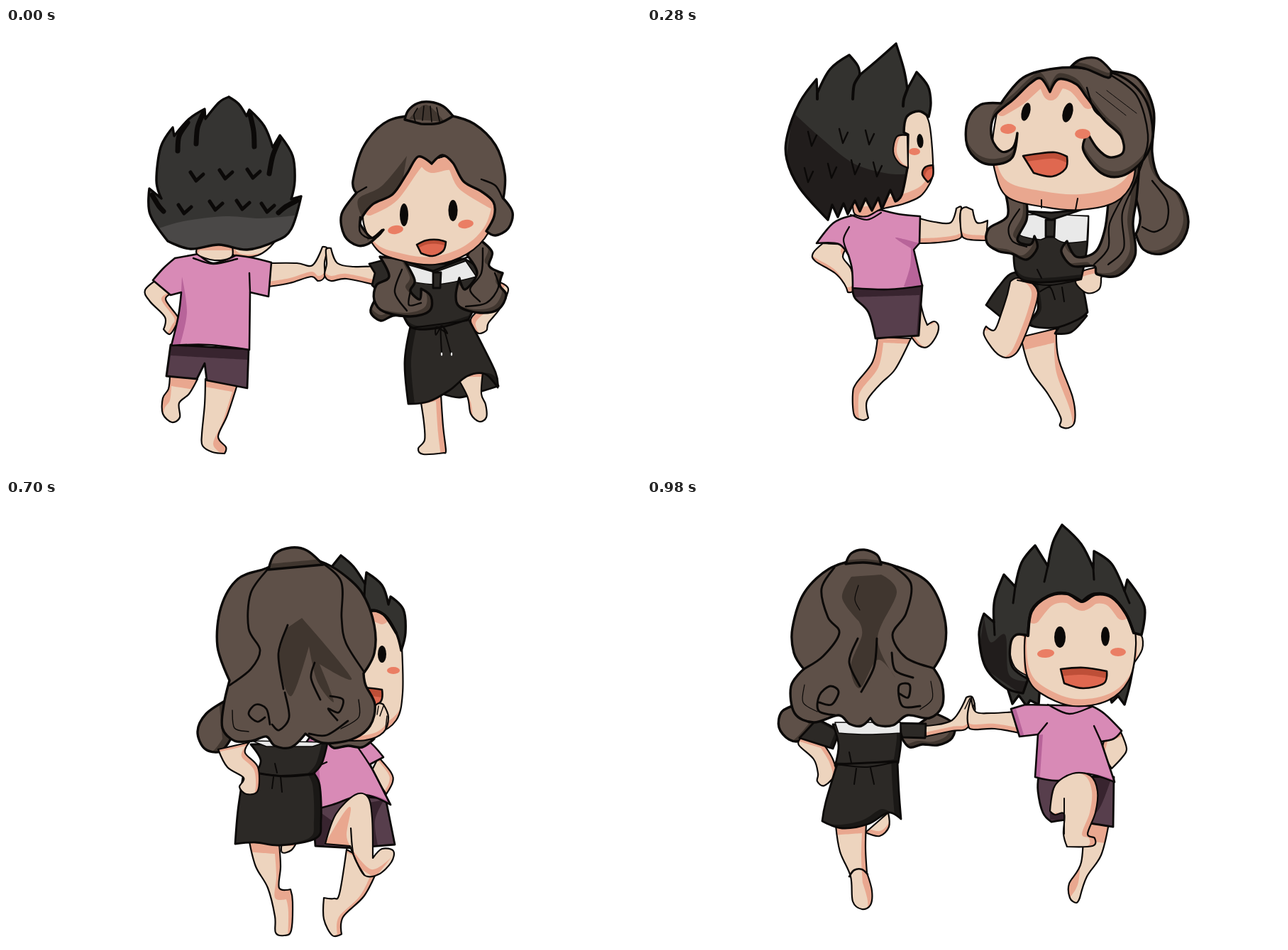
Write an HTML page that moves like this. It is 895x625 px and loops after 1.12 s.

```html
<!DOCTYPE html>
<html lang="en">
<head>
<meta charset="utf-8">
<title>Spinning dance</title>
<style>
html, body { margin: 0; width: 100%; height: 100%; overflow: hidden; background: #fff; }
svg { display: block; width: 100%; height: 100%; }
</style>
</head>
<body>
<svg id="stage" viewBox="0 0 895 625" stroke-linejoin="round" stroke-linecap="round"></svg>
<script>
const INK = '#0b0908', STEP = 140;
let clips = 0;

// Smooth curve through "x,y" points; a trailing "!" makes a corner.
function curve(text, closed) {
  const pts = [...text.matchAll(/(\d+),(\d+)(!?)/g)].map(m => ({ x: +m[1], y: +m[2], sharp: m[3] }));
  const n = pts.length;
  const at = i => closed ? pts[(i + n) % n] : pts[Math.max(0, Math.min(n - 1, i))];
  const handle = (i, side) => {
    const p = at(i), k = p.sharp ? 0 : side / 6;
    return `${p.x + (at(i + 1).x - at(i - 1).x) * k} ${p.y + (at(i + 1).y - at(i - 1).y) * k}`;
  };
  let d = `M${pts[0].x} ${pts[0].y}`;
  for (let i = 0; i < n - !closed; i++)
    d += `C${handle(i, 1)} ${handle(i + 1, -1)} ${at(i + 1).x} ${at(i + 1).y}`;
  return d;
}

// Shading is either a drawn patch or the shape's own rim, left bare by a shifted copy.
const material = (fill, shade, width) => (outline, dx = 0, dy = 0) => {
  const d = curve(outline, true), id = 'clip' + clips++, patch = typeof dx === 'string';
  const inner = patch ? `<path d="${curve(dx, true)}" fill="${shade}"/>`
    : `<path d="${d}" fill="${fill}" transform="translate(${dx} ${dy})"/>`;
  return `<clipPath id="${id}"><path d="${d}"/></clipPath><path d="${d}" fill="${patch ? fill : shade}"/>` +
    `<g clip-path="url(#${id})">${inner}</g><path d="${d}" fill="none" stroke="${INK}" stroke-width="${width}"/>`;
};
const skin = material('#edd4be', '#e9a78f', 2.2);
const spiky = material('#33322f', '#211d1c', 3.4);
const nape = material('#353432', '#4a4847', 3.4);
const shirt = material('#d88ab6', '#b8649a', 2.6);
const shorts = material('#573e4c', '#38242f', 2.8);
const hair = material('#5e5048', '#40362f', 3.4);
const dress = material('#2c2926', '#1a1816', 2.8);
const white = material('#e9e9e9', '#ccc', 1.5);
const mouth = material('#df6850', '#be4f38', 2.6);

const line = (width, path, color = INK) =>
  `<path d="${curve(path)}" fill="none" stroke="${color}" stroke-width="${width}"/>`;
const lines = (width, ...paths) => paths.map(p => line(width, p)).join('');
const glow = path => line(18, path, '#e9a78f');
const oval = (fill, x, y, rx, ry, turn = 0) =>
  `<ellipse cx="${x}" cy="${y}" rx="${rx}" ry="${ry}" fill="${fill}" transform="rotate(${turn} ${x} ${y})"/>`;
const eye = (...a) => oval(INK, ...a);
const blush = (...a) => oval('#ea7e64', ...a);
const ticks = (width, w, h, ...spots) => lines(width, ...spots.map(([x, y]) =>
  `${x - w},${y - h}! ${x - 1},${y + h}! ${x + w},${y - (h >> 1)}!`));
const shift = (x, y, figure) => `<g transform="translate(${x} ${y})">${figure}</g>`;
const draw = (...parts) => parts.join('');

const boyBack = draw(
  skin('231,488! 229,508 221,521 221,543 234,555 245,548 244,528 258,515 270,494!', 2, 16),
  skin('281,494! 280,530 276,572 277,588 291,597 308,599! 310,590 299,575 312,545 326,502!', -7, 10),
  shorts('232,446! 226,490! 269,494! 280,472! 283,496! 340,507! 342,452!', 0, 15),
  skin('216,352! 196,369 203,385 224,407 222,424! 231,431 240,418 243,408 225,382 238,372!', -6, 0),
  skin('370,331! 410,331 432,334 446,308! 453,311 449,330 449,350 440,356 430,350 400,359 370,364!', 0, -7),
  skin('312,308! 325,322 355,320 377,303 380,288!', 6, -4),
  shirt('238,324! 222,338 207,355! 232,376! 247,372! 243,405 233,447! 285,446 343,453! 344,372! 370,378! 374,330! 345,323 324,320! 292,331 271,318!', '247,372! 233,447! 245,447! 255,400 248,350!'),
  skin('273,303! 269,318 294,327 318,322 318,303!', 0, 10),
  lines(2.4, '264,324 292,332 326,325', '344,372! 343,345!'),
  nape('314,97! 300,105 281,128! 280,114! 258,128 237,152! 235,140! 218,168 212,215 219,240! 202,226! 203,262 228,300! 260,311 300,305 340,312 380,300 402,283 416,237! 402,241! 407,215 404,180 386,151! 376,168! 364,138 343,115! 339,124! 328,107', '210,284! 250,272 310,265 360,268 415,263! 400,330! 215,325!'),
  lines(7, '256,133 244,152 242,173', '278,120 270,140 268,163', '344,122 349,145 350,167', '385,158 376,180 371,205', '206,235 215,250 222,258', '410,243 395,251 384,260'),
  ticks(5, 9, 6, [269, 209], [310, 206], [349, 205], [252, 255], [296, 250], [334, 249], [369, 253]));

const girlFront = draw(
  hair('520,383! 514,400 528,412 545,405 565,403 565,380!', 0, -8),
  dress('615,515! 640,520 668,512 694,504! 675,480 640,480!'),
  skin('632,485! 650,518 655,543 667,554 677,548 676,530 670,515 672,485!', 4, 6),
  skin('584,522! 589,555 590,580 581,592 588,600 618,598! 620,594 616,560 613,515!', -7, 10),
  skin('696,358! 708,368 696,395 680,415 677,426 664,429 655,410 672,392 685,375!', 7, 5),
  dress('570,420! 562,470 567,529! 595,526 625,510 650,490 675,487 693,506! 690,485 668,440 652,410!', 9, 0),
  skin('520,335! 490,336 467,331 458,310! 451,312 452,332 449,348 458,356 480,353 521,362!', 0, -7),
  dress('512,332! 520,345! 516,362! 535,372 558,345 535,326!'),
  dress('545,328! 550,370 560,405 575,423 610,422 652,410! 662,385 664,340 645,325!', 0, -5),
  white('548,328! 604,344! 648,328! 663,350! 605,361 550,352!'),
  dress('556,326! 602,342! 652,322! 620,332 590,328!'),
  dress('602,344! 613,344! 612,366! 602,366!'),
  lines(2, '572,422 610,417 650,412', '613,420 606,432 607,421 622,430 613,420 614,457', '617,422 627,458'),
  oval('#eee', 614, 459, 1.2, 2.5), oval('#eee', 628, 459, 1.2, 2.5),
  hair('527,322! 540,350 522,362 519,383 532,399 570,406 597,398 599,378 585,367! 583,382 570,370 576,355 560,325!', -7, -5),
  hair('665,296! 685,315 681,335 700,345! 696,362 705,376 694,396 668,401 640,393 634,377 639,352! 647,368 664,345 650,320!', -6, -5),
  lines(2.4, '558,340 548,372 565,398', '570,370 568,390 585,387', '672,310 670,345 654,368 668,385', '689,345 694,365 677,387 648,392'),
  skin('525,215! 503,265 523,312 560,328 605,333 650,318 680,288 692,245! 650,180 600,185 560,185', -4, -11),
  glow('512,255 545,236 582,187 600,195 629,192 645,220 685,245'),
  hair('596,122 540,130 505,165 489,215 494,232! 473,262 477,292 495,306 512,303 532,284! 518,296 503,282 500,270 517,248 545,234 565,205 581,181 600,191! 615,179 630,190 645,216 670,230 687,245 688,265 677,286! 690,292 708,282 714,260 701,240! 703,205 690,165 660,135 625,123', '500,262! 497,240 530,222 565,180! 555,240! 510,300!'),
  lines(2.4, '499,266 499,287 514,296 530,284', '670,213 690,222 700,240', '494,232 508,224'),
  hair('562,129! 567,116 580,106 597,104 616,110 630,124! 610,134 585,135!', '568,128! 592,108 618,132!'),
  lines(1.6, '580,113 575,122 577,132', '589,110 587,130', '598,110 600,132', '607,112 611,131'),
  eye(561, 263, 6, 16), eye(630, 257, 6.5, 15), blush(549, 284, 11, 6, -8), blush(648, 276, 11, 6, -8),
  mouth('579,305! 592,299 608,298 620,301! 616,314 601,321 585,317!', 0, 6));

const boyLeap = draw(
  skin('385,385! 390,405 395,418! 405,413 411,420 407,435 395,449 383,447 372,434!', 5, 0),
  skin('325,435! 318,470 295,500 290,515 292,545 304,552 312,549! 310,525 330,500 350,480 372,437!', 8, 8),
  skin('248,303! 234,317 237,328 265,345 278,360 283,372! 292,368 288,340 276,322 285,305!', -3, -7),
  shorts('290,365! 293,380 312,400 322,437! 350,435 383,433! 388,362!', -4, 14),
  skin('384,268! 405,273 428,274 436,254! 443,252 441,268 444,290 437,298 410,302 384,303!', 0, -7),
  shirt('285,265! 262,275 239,303! 270,304 284,320! 289,340 290,366! 340,368 388,363! 376,312! 384,303! 385,265! 355,262 330,256!', '388,363! 362,364! 371,335 372,310! 350,295 384,303!'),
  skin('290,245! 293,262 310,265 330,255 360,248 385,237 398,220 403,205 402,170 398,135 390,116! 360,118!', 0, -14),
  lines(2.2, '287,263 310,270 330,260', '285,280 277,298 284,320'),
  spiky('351,22! 325,45 300,66! 297,53 285,38! 258,58 240,92! 239,72! 215,105 198,150 197,185 215,225 255,270! 261,249! 269,266! 277,247! 283,262! 293,243! 300,258! 308,240! 317,257! 326,239! 331,255! 343,228! 350,244! 359,235 367,197! 368,150! 362,147! 366,125 383,117 397,125! 400,105 396,82 380,62! 367,86! 362,58', '205,118! 240,150 290,190 340,205 370,205! 370,280! 185,280!'),
  lines(4, '300,66 292,80 290,100', '367,86 362,100 361,110', '240,92 240,100'),
  skin('367,151! 352,153 347,174 355,190 368,197!', 5, 0),
  ticks(2.4, 6, 10, [233, 156], [277, 152], [314, 154], [228, 207], [261, 201], [294, 196], [325, 199]),
  eye(385, 159, 4.5, 10, -5), blush(377, 174, 8, 5),
  mouth('403,193! 392,196 388,206 396,217! 403,208', 4, 4));

const girlLeap = backHair => draw(
  hair(backHair, -7, -5),
  skin('527,435! 540,480 565,515 583,548 582,560 594,563 603,553 600,520 580,465 577,423!', -3, 20),
  dress('575,430! 598,428 620,405! 600,390!'),
  dress('478,390! 495,365 515,345 545,348! 550,385! 500,408!', -5, 0),
  dress('545,355! 551,395 538,417 575,422 608,410 621,400! 614,365 605,350!', 5, 0),
  skin('512,357! 522,352 540,357 551,372 545,400 530,440 520,458 505,464 490,455 475,432 478,420! 490,425 500,400 508,375!', -9, 0),
  skin('660,300! 650,330 612,343 604,358 620,373 637,368 640,352!', 0, 8),
  dress('525,265! 517,310 522,348 550,358 612,353! 620,310 622,265!', 0, -6),
  white('530,263! 524,290 555,298! 570,292! 588,302 620,300! 622,265! 572,262!'),
  dress('562,270! 575,270! 574,294! 562,294!'), dress('535,258! 570,270! 612,256! 570,260!'),
  lines(2, '522,355 565,362 612,354', '570,362 554,371 568,365 575,382', '585,365 588,385', '550,340 556,352'),
  skin('480,271! 465,274 459,256! 450,252! 442,258 443,288 450,297 478,299!', 0, -7),
  hair('505,232! 508,265 482,282 479,302 495,314 515,318 535,326 550,310 546,293! 540,305 522,298 535,270 535,245!', -6, -6),
  hair('695,180! 690,240 685,275 688,320 665,348 635,347 630,335 600,335 584,315 592,300! 605,322 632,315 645,285 650,245!', -8, -5),
  lines(2.2, '525,255 510,280 515,300 535,308', '690,215 670,260 672,310 650,333', '672,235 652,275 650,310 630,333'),
  skin('495,110! 487,160 490,200 508,238 560,252 610,256 660,245 685,215 690,160! 640,105 600,70 575,82 540,72', 0, -22),
  lines(2, '556,242 556,253', '607,240 604,256'),
  glow('500,115 525,100 556,75 569,93 582,77 602,82 622,105'),
  hair('575,57 530,70 499,106! 470,108 452,130 451,165 468,187 492,192 515,182 522,148! 516,168 500,174 486,155 489,125 517,100 540,78 555,71 568,90! 580,72 605,79 620,98 645,130 668,152 671,175 652,182 635,170 621,148! 615,172 640,204 670,208 700,185 713,150 702,100 668,68 620,57', 0, -8),
  lines(2.4, '652,65 690,95 706,150 698,190 680,235', '620,84 630,115 645,128'),
  lines(1, '633,90 675,123', '648,88 690,120'),
  hair('598,54! 612,44 635,43 654,60! 650,70 620,58', 0, -7),
  eye(534, 118, 6, 13, 15), eye(593, 119, 7, 14, 15), blush(509, 142, 11, 7, -5), blush(614, 149, 11, 7),
  mouth('530,180! 550,177 575,175 592,181! 590,198 571,209 545,204!', 0, 9));

const boyClose = draw(
  skin('399,385! 398,440 400,473 406,480 436,478 441,470 427,460 430,420 427,385 410,380!', 8, 3),
  skin('333,445! 325,480 308,535 312,555 325,573 341,569! 336,535 345,510 375,475 383,447!', 8, 12),
  skin('292,325! 283,340 295,352 312,362! 316,335!', 3, -7),
  shorts('316,376! 315,395 328,415 329,445! 365,446 395,447! 405,400 425,383! 400,376!', 0, 14),
  shirt('318,287! 300,300 284,320! 300,325 315,337! 308,373! 350,383 405,378! 400,345! 383,330! 399,305 393,290 380,278!', '399,340! 406,380! 374,382! 382,350 375,325!'),
  skin('386,308! 405,302 430,300 432,285! 440,283 450,298 445,325 420,330 388,336! 382,322!', 0, -7),
  skin('322,255! 320,284 340,288 358,279 395,276 420,262 431,235 437,210 434,160 425,136! 380,140!', 0, -14),
  lines(2, '317,288 340,291 378,281', '356,266 357,278', '317,300 315,337'),
  spiky('240,140! 250,108! 268,108! 276,92! 300,72! 312,85! 345,54! 364,65! 330,180!'),
  spiky('380,40! 365,58 349,92! 330,64! 305,85 295,110! 282,93! 266,112 257,138! 243,133! 230,170 232,200 252,242 300,266 310,281! 319,262! 326,275! 334,262! 343,272! 350,260! 359,275! 366,262! 374,266! 384,250 383,190! 388,187! 388,160 405,135 428,142! 428,110 412,75', '228,160! 270,198 325,225 390,237! 390,290! 220,290!'),
  lines(3, '349,92 345,125', '295,110 288,145', '257,138 258,160'),
  skin('383,188! 370,190 368,208 376,225 386,230!', 5, 0),
  eye(416, 186, 6, 12), blush(402, 211, 12, 7),
  mouth('435,223! 424,228 421,240 426,249! 434,240', 4, 4));

const girlClose = draw(
  hair('560,75! 635,75 668,130 668,190 685,230 725,250 740,275 727,308 690,323 650,317 632,300! 640,250 620,200!', -9, -7),
  lines(2.4, '648,210 665,250 690,265', '650,270 660,290 674,280 660,265', '655,170 662,200 680,230'),
  hair('508,83! 518,69 550,62 575,67 590,80!', 0, 7),
  skin('460,415! 456,455 455,484 440,487 442,497 475,508 487,505 490,480 497,445!', -7, 12),
  skin('515,445! 525,485 555,525 566,545 560,580 577,581 586,550 570,520 557,485 560,462!', -3, 14),
  skin('640,355! 572,368 567,385 578,396 592,393 597,378 640,368!', 0, 5),
  dress('497,382! 452,400 446,420! 480,430 520,448 568,470! 578,460 588,420 585,395 570,385!', -8, 0),
  dress('500,300! 497,350 495,385! 530,390 572,386! 580,350 580,290!', 0, -7),
  white('520,292! 506,315! 529,323! 538,298!'), white('555,302! 552,318 570,330 578,318 572,302!'),
  dress('524,290! 540,298! 570,295! 540,306!'),
  lines(1.8, '529,300 530,324 545,325 545,300', '520,372 525,383', '550,370 544,384', '577,387 586,387'),
  skin('438,286! 447,284 460,300 469,310 463,320 448,315 440,300!', 0, -4),
  lines(1.5, '445,286 454,300', '440,286 448,302'),
  hair('470,255! 480,290 470,312 449,322 452,338 475,348 510,354 528,335 528,320! 510,335 498,318 510,275!', -6, -6),
  hair('625,210! 642,250 632,295 648,330 640,360 615,370 590,360 565,358 545,342 545,328! 560,344 590,335 603,310 575,300 590,255!', -6, -6),
  lines(2.4, '493,280 485,310 500,335 515,337', '628,240 612,280 622,320 605,350', '605,260 597,290 607,320 590,345 560,350'),
  skin('460,160! 455,210 465,245 500,272 550,285 590,270 610,220 600,150 560,115 500,120', 0, -12),
  glow('462,182 478,148 496,126 507,141 522,126 540,136 558,165'),
  hair('540,76 490,90 460,125 447,163! 429,173 429,202 448,223 472,215 482,190! 470,203 457,195 459,175 477,142 496,121 507,137! 520,122 540,131 560,165 590,183 605,205 585,222 566,215 557,195! 553,225 580,248 615,245 640,215 649,160 625,110 590,80', 0, -8),
  lines(2.4, '612,90 640,125 655,170', '538,120 560,162 575,175'), lines(1, '548,120 590,148', '600,130 620,150'),
  eye(483, 174, 5.5, 11), eye(535, 175, 5.5, 12), blush(466, 192, 7, 5), blush(558, 197, 11, 7),
  mouth('488,224! 510,222 529,226! 527,243 510,249 489,243!', 0, 9));

const girlSide = draw(
  skin('390,488! 375,512 350,525 350,533 368,559 376,559! 375,540 405,525 413,490!', 5, 7),
  skin('412,510! 430,555 445,590 479,587! 478,578 460,568 440,515!', -9, 0),
  shorts('381,420! 378,480! 412,490! 432,428!', 9, 5),
  skin('405,335! 392,370 395,395! 420,390 425,340!', -9, 0),
  shirt('400,382! 388,402 373,420! 398,428 432,430! 425,385!', 9, 0),
  skin('480,326! 508,324 525,285!', 0, -7),
  hair('480,108! 525,108 558,142 562,195 577,240 620,247 655,262 658,298 643,320 617,325! 605,360 570,378 535,376 505,357 504,325 524,300! 523,325 540,335 552,318 545,303 525,288 523,230 500,150!', -7, -7),
  lines(2.4, '555,185 538,235 550,270 590,285 616,325', '620,250 630,268 617,297', '553,243 585,268 620,275'),
  lines(1, '524,140 540,190', '545,150 540,230'),
  skin('428,510! 425,560 418,595 401,606 405,613 440,618 446,610 450,575 465,540 460,505!', -8, 15),
  skin('455,512! 475,540 515,565 513,590 525,594 547,558 535,545 510,520 495,505!', 4, 10),
  dress('428,425! 416,470 414,518! 460,508 510,513! 517,470 505,415 470,415!', -8, 0),
  dress('470,325! 420,345 415,395 430,428! 470,430 490,400 510,366! 498,338 485,328!', '430,428! 420,395 440,425! 445,400 455,428!'),
  skin('468,378! 465,405 458,430 464,442 488,443 494,425 490,415 512,390 510,371! 490,372!', 6, 6),
  lines(1.6, '468,430 475,435 481,430 488,434', '466,440 470,434', '488,415 488,428'),
  skin('330,210! 328,240 343,290! 348,312 362,325 385,333 410,333 450,300 470,250 400,210 350,185', 0, -12),
  glow('333,215 340,198 352,194 368,206 385,230 412,238'),
  hair('325,222! 304,250 302,282 320,299 344,291! 342,270 334,274 326,262 322,240!', 0, -9),
  hair('405,131 355,146 322,182 314,220! 325,219 332,198 350,190 368,202 385,226 412,233 415,252 398,263 376,256! 388,283 420,291 445,283 452,246! 466,280 450,310 420,345! 455,345 490,325 515,285 526,220 515,175 480,142', 0, -8),
  skin('452,245! 464,243 467,258 460,280 443,300! 432,293 448,285', -5, 0),
  lines(2.4, '417,207 438,210 451,230 448,265', '432,293 440,300 453,292'), lines(1, '450,195 455,240', '500,205 508,255'),
  hair('458,312! 425,340 403,350 400,375 420,392 450,390 470,372 466,352 450,345! 453,365 440,372 430,362 485,322!', 5, -6),
  lines(2.4, '410,348 414,372 440,380 458,370'), line(3, '450,390 467,385', '#eee'),
  hair('422,130! 422,110 440,95 465,93 486,106! 483,122 462,134 440,136', 0, -8),
  '<path d="M450 134Q480 132 486 112" fill="none" stroke="#eadfce" stroke-width="6" stroke-dasharray="4 3" stroke-linecap="butt"/>',
  eye(365, 253, 6.5, 11, -5), blush(387, 258, 10, 6),
  mouth('346,295! 362,290 378,291! 380,308 375,326! 355,317!', 0, 9));

const girlTurned = draw(
  hair('245,255! 215,275 203,300 213,324 235,328 250,310!', -12, 0),
  hair('385,312! 395,323 415,320 435,322 452,310!'),
  skin('322,455! 322,470 335,467 343,455!', 0, 6),
  skin('276,455! 285,490 302,520 312,560 313,583 325,587 335,580 337,540 334,522! 318,520 320,490 318,458!', -6, 14),
  dress('268,358! 260,410 256,458! 285,456 320,460 370,450 377,425 375,375 365,357!', -10, 0),
  dress('278,318! 292,340 285,358! 325,363 365,360! 378,345 386,316!', -8, 0),
  white('280,313! 300,321! 365,321! 384,315!'),
  lines(2, '283,358 320,362 365,359', '312,345 315,358', '310,364 308,380', '320,363 322,385'),
  skin('232,325! 245,350 268,365 262,378 272,388 288,383 288,350 270,330 276,315!', -5, 5),
  skin('395,312! 440,312 465,301 472,280 465,262! 455,262 440,288 410,295!', 0, -7),
  lines(1.5, '458,264 456,276', '465,264 460,278', '470,278 468,296'),
  hair('338,52 300,70 260,85 236,125 231,180 248,228! 240,262 238,295 255,313 280,313 300,307 312,320 335,322 355,303! 380,316 420,311 446,292 453,262 440,235 437,218! 452,190 452,150 435,105 405,76 375,60', '328,155! 318,200 335,250 360,180! 372,230 395,258 375,205! 420,225 350,140!'),
  lines(2.8, '303,70 278,105 275,155 291,185 278,212 248,235', '372,58 405,88 406,140 412,175 437,215', '330,150 317,190 324,240', '368,203 363,225 376,255', '298,280 287,286 275,275 285,262 300,268 305,290', '390,250 408,255 402,273 387,268 400,284', '326,245 332,280 318,298 308,290', '415,285 385,305 360,303'),
  lines(1.4, '252,270 255,295 275,300', '430,255 430,280 405,296'),
  hair('303,72! 312,50 335,41 357,45 380,65!', 0, -8));

const boyTurned = draw(
  spiky('440,185! 446,215! 458,242! 466,255! 470,237! 486,262! 492,248! 480,190!', -6, 0),
  skin('550,420! 540,482 532,489 518,488! 518,518 530,541 543,539! 545,515 575,485 595,445!', -6, 0),
  skin('595,290! 613,312 615,325 606,342! 585,310!', -5, 0),
  shorts('502,362! 506,415! 560,418! 618,413! 605,348! 560,345!', '502,360! 504,418! 516,418! 550,360! 603,350! 590,380 595,418! 580,415!'),
  skin('493,276! 475,277 470,290 467,301 490,306! 498,290!', 0, -6),
  shirt('498,262! 485,285 488,305! 504,305! 505,330 496,366! 530,357 575,343 612,357! 583,300! 602,290! 580,267 555,262!', 7, 0),
  lines(2.4, '558,265 585,305 612,357', '504,305 522,297', '515,264 535,275 558,268'),
  skin('520,412! 535,370 562,343 580,346 586,375 587,432! 600,419 616,422 613,438 595,455 575,456 560,428 555,415!', '518,415! 545,370 556,362 550,400 557,418! 585,448 614,430! 590,460!'),
  lines(2.2, '556,390 560,428 575,456'),
  skin('480,163! 460,161 453,182 460,208 482,220!', 7, 0),
  skin('482,165! 484,220 497,248 540,263 590,258 620,238 629,200 628,135! 600,80 570,85 530,75 495,120!', 3, -12),
  glow('488,175 498,135 522,96 545,88 568,110 582,90 600,94'),
  spiky('542,6! 522,32 513,52! 508,28! 488,50 480,72! 463,56! 445,83 437,125 447,163! 470,160 486,180! 492,140 520,92 545,84 568,106! 582,84 604,90 620,115 627,140! 633,115 630,82 612,64! 609,75! 600,48 578,30! 576,46! 560,22', '463,58! 464,95 475,120 480,165! 497,130 520,90! 490,105'),
  line(4, '486,180 494,138 520,93 545,85 568,106 582,85 602,89 620,115'),
  lines(3, '480,72 475,95', '513,52 507,75', '576,46 575,65'),
  eye(539, 144, 8, 14), eye(600, 145, 6, 12), blush(515, 170, 13, 7, -5), blush(616, 168, 9, 5),
  mouth('544,197! 570,192 600,195! 598,212 575,225 550,216!', 0, 11));

const girlBack = draw(
  hair('212,288! 190,298 186,320 200,337 218,338 240,315!', -12, 0),
  hair('358,333! 370,348 388,344 410,345 430,335 432,315 405,300!', -6, -5),
  skin('308,468! 328,473 341,460 340,440!', 0, -7),
  skin('266,458! 272,495 287,530 290,565 303,576 315,570 317,550 310,525! 308,490 309,455!', -6, 14),
  lines(2.6, '285,530 292,521 303,520 311,527'),
  skin('217,335! 214,345 235,365 241,385 240,396 250,402 266,385 262,365 250,345!', -5, 4),
  dress('240,308! 215,335! 262,350! 272,325!', -6, 0),
  skin('392,318! 430,310 450,278! 459,278 462,300 450,322 430,325 393,333!', 0, -6),
  lines(1.5, '455,279 448,294', '462,286 456,300'),
  dress('352,314! 360,334! 392,335! 393,315!'),
  dress('262,316! 270,345 265,374! 310,375 354,370! 358,340 357,314!', -6, -5),
  white('265,313! 357,313! 357,328! 310,330 270,328!'),
  dress('268,372! 252,425 247,452! 275,462 312,456 340,440 358,449! 355,410 353,368!', -9, -5),
  lines(2, '266,372 310,376 354,368', '295,378 292,400', '315,377 320,400', '285,355 288,370'),
  hair('306,85 260,95 222,130 205,180 207,215 221,238! 203,262 208,300 235,313 270,303 285,315 302,318 315,307! 325,317 347,317 367,303 398,307 416,290 416,260 404,237! 420,205 418,160 395,115 350,93', '288,108! 275,138 298,170! 303,190 287,235 300,265 325,225 350,250! 325,195 352,130 330,105!'),
  lines(3, '264,95 246,125 255,165 271,187 248,220 221,238', '346,92 372,118 365,160 346,190 365,222 404,237', '324,195 320,235 302,270', '297,195 285,228 300,262', '345,215 350,240 375,250', '243,285 260,288 270,270 258,262 243,275 242,297 265,303', '355,272 368,278 370,260 355,262 360,290 385,290'),
  lines(1.2, '298,120 293,140 300,155', '222,260 220,285 240,298', '400,255 402,280 385,295'),
  hair('280,90! 288,75 306,70 324,77 330,91! 305,88', 0, -5));

const boyFront = draw(
  spiky('505,255! 515,287! 524,275! 535,290! 540,282! 552,288! 555,245!'),
  spiky('650,270! 655,285! 664,276! 673,288! 680,262 686,230!'),
  skin('615,450! 612,510 595,540 596,560 605,567 610,560! 620,530 640,500 651,455!', -4, 28),
  skin('645,335! 668,327! 676,350 670,362 655,378! 640,355!', 4, 5),
  shorts('552,388! 551,410 558,440 570,453! 600,450 625,455 657,460! 658,390!', '550,388! 585,390! 570,410 568,450! 622,455! 640,430 655,390!'),
  skin('520,298! 485,300 463,298 457,278! 452,300 453,318 460,323 490,322 525,328!', 0, -7),
  shirt('533,288! 513,294! 525,333! 551,330! 547,390! 580,395 618,385 659,397! 640,340! 658,336 669,325! 645,301 627,290!', 7, 0),
  lines(2.4, '565,288 595,301 627,291', '551,330 564,314', '640,340 630,318'),
  skin('568,438! 575,402 600,385 625,388 635,410 632,440 621,470 631,476 628,487 592,488! 587,470 588,442 575,443', -8, 0),
  lines(2, '588,420 588,470'),
  skin('537,193! 518,188 511,210 518,235 537,248!', -6, 0),
  skin('685,188! 697,191 698,210 686,230!', 5, 0),
  skin('537,165! 532,205 536,248 555,272 600,290 650,282 680,252 689,205 685,165! 650,125 612,140 570,125', 3, -10),
  glow('545,165 566,141 592,136 613,147 632,137 654,141 670,160'),
  spiky('585,35! 572,60 565,93! 547,64! 528,88 519,122! 503,105! 490,140 489,172! 475,160! 468,190 477,235 505,264 530,272! 537,252! 515,235 512,205 520,190 537,191! 542,155 565,135 590,131 613,143! 630,132 655,136 675,160 686,187! 697,190! 701,150 677,112! 673,128! 655,90 630,72! 629,96! 612,62', '475,165! 484,200 505,190 510,245 535,255! 530,275! 465,230!'),
  line(4, '537,191 542,157 565,136 592,132 613,143 632,133 655,137 675,160 686,187'),
  lines(3, '565,93 560,115', '519,122 516,145', '489,172 490,190', '629,96 630,112', '673,128 680,145'),
  eye(582, 193, 8, 15), eye(646, 192, 6, 13.5), blush(562, 216, 12, 6, -5), blush(664, 214, 11, 6),
  mouth('583,238! 615,236 648,241! 644,258 615,265 588,258!', 0, 10));

const settled = '640,60! 690,70 711,110 716,170 712,230 710,280 690,310 660,200!';
const swinging = '640,60! 690,70 714,115 712,175 722,212 750,235 763,272 752,303 725,318 700,312 689,290! 695,265 680,220 650,200!';
const poses = [
  boyBack + girlFront,
  shift(1, 46, boyLeap) + shift(6, 38, girlLeap(settled)),
  boyLeap + girlLeap(swinging) + lines(2.4, '712,215 733,245 732,275 715,287 698,280'),
  boyClose + girlClose,
  girlSide,
  shift(-70, 72, boyTurned) + shift(67, 26, girlTurned),
  boyTurned + girlTurned,
  girlBack + boyFront
];

const stage = document.getElementById('stage');
stage.innerHTML = poses.map(pose => `<g display="none">${pose}</g>`).join('');
const groups = [...stage.children];

function render() {
  const current = Math.floor(performance.now() / STEP) % groups.length;
  groups.forEach((g, i) => g.setAttribute('display', i === current ? 'inline' : 'none'));
  requestAnimationFrame(render);
}
render();
</script>
</body>
</html>
```
